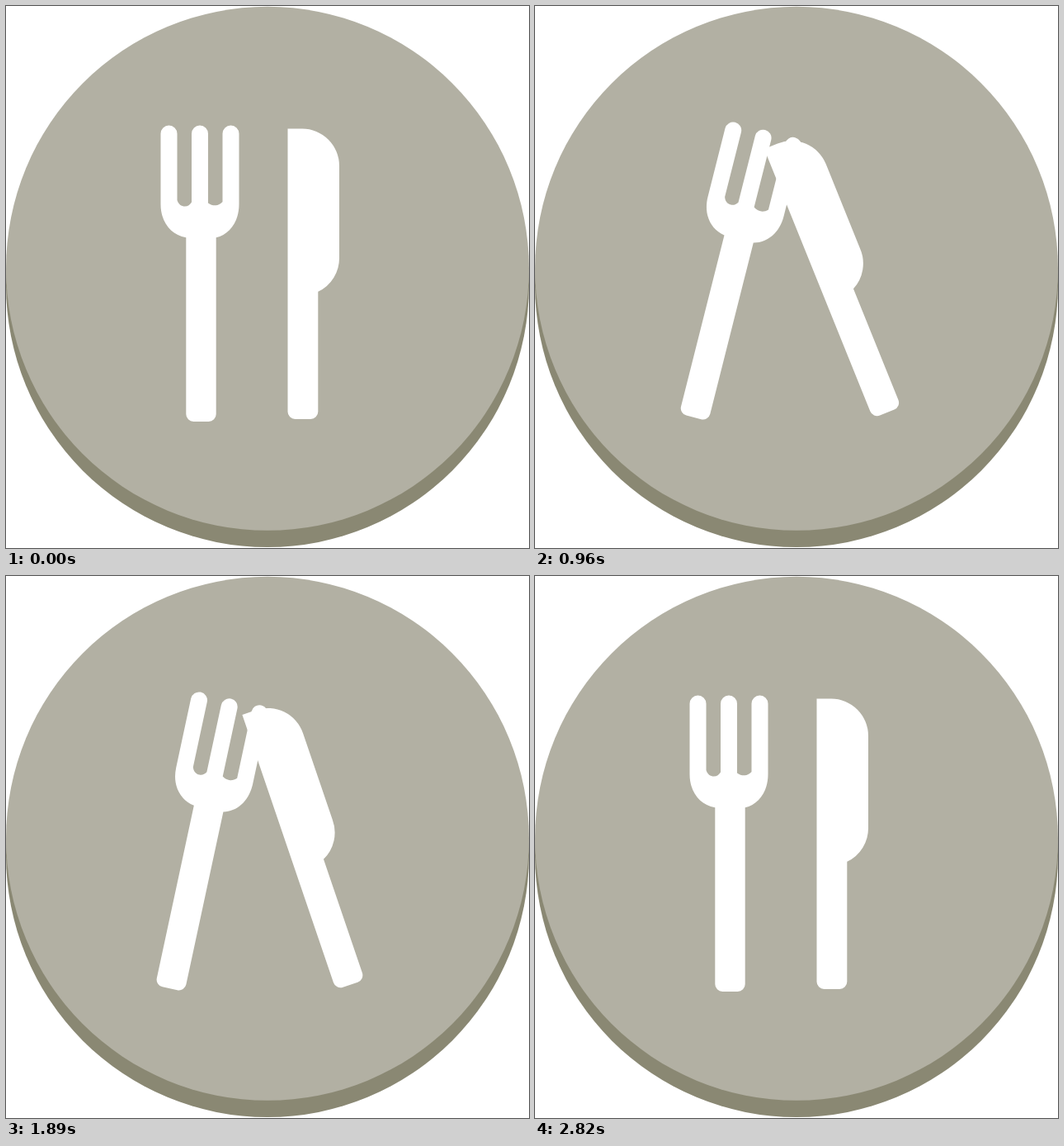
Recreate the animation shown at these times as an HTML page. Size 634 by 656 pixels, loop 2.85 s.

```html
<!DOCTYPE html>
<html lang="en">
<head>
<meta charset="utf-8">
<title>Fork and knife button</title>
<style>
  html, body { margin: 0; width: 100%; height: 100%; overflow: hidden; background: #fff; }
  svg { display: block; width: 634px; height: 656px; }
</style>
</head>
<body>
<svg viewBox="0 0 634 656">
  <circle cx="317" cy="338" r="317" fill="#8a8873"/>
  <circle cx="317" cy="317.8" r="317" fill="#b2b0a3"/>
  <g fill="#fff">
    <path id="fork" d="M187.5 154.5a10 10 0 0 1 20 0V235
      C209 240 212.5 242.5 217 242.5C220.5 242.5 223 240.5 225 237.5
      V154.5a10 10 0 0 1 20 0V238.5
      C248 240.5 250 241.3 253.5 241.3C257 241.3 260 239.5 262.5 237
      V154.5a10 10 0 0 1 20 0V240
      C282.5 261 271 276.5 254.7 280.3
      V494a9 9 0 0 1-9 9H227.3a9 9 0 0 1-9-9V280.3
      C199.5 277 187.5 261 187.5 240Z"/>
    <path id="knife" d="M341.5 148.5H359a45 45 0 0 1 45 45V304
      A45 45 0 0 1 378.3 345.8V491a9 9 0 0 1-9 9H350.5a9 9 0 0 1-9-9Z"/>
  </g>
</svg>
<script>
  const LOOP = 2850, STEP = 30;
  const START = 150, PEAK = 1290, END = 2820;
  const fork = document.getElementById('fork');
  const knife = document.getElementById('knife');

  // 0 at rest, 1 when fully crossed; linear in, slower linear out
  function swing(t) {
    if (t <= START || t >= END) return 0;
    return t < PEAK ? (t - START) / (PEAK - START) : (END - t) / (END - PEAK);
  }

  function turn(el, angle, x, y) {
    el.setAttribute('transform', `rotate(${angle} ${x} ${y})`);
  }

  function draw(time) {
    const t = Math.floor((time % LOOP) / STEP) * STEP;
    const k = swing(t);
    turn(fork, 20 * k, 235, 323.75);
    turn(knife, -31 * k, 372.75, 324.25);
  }

  function tick() {
    draw(performance.now());
    requestAnimationFrame(tick);
  }
  tick();
</script>
</body>
</html>
```
